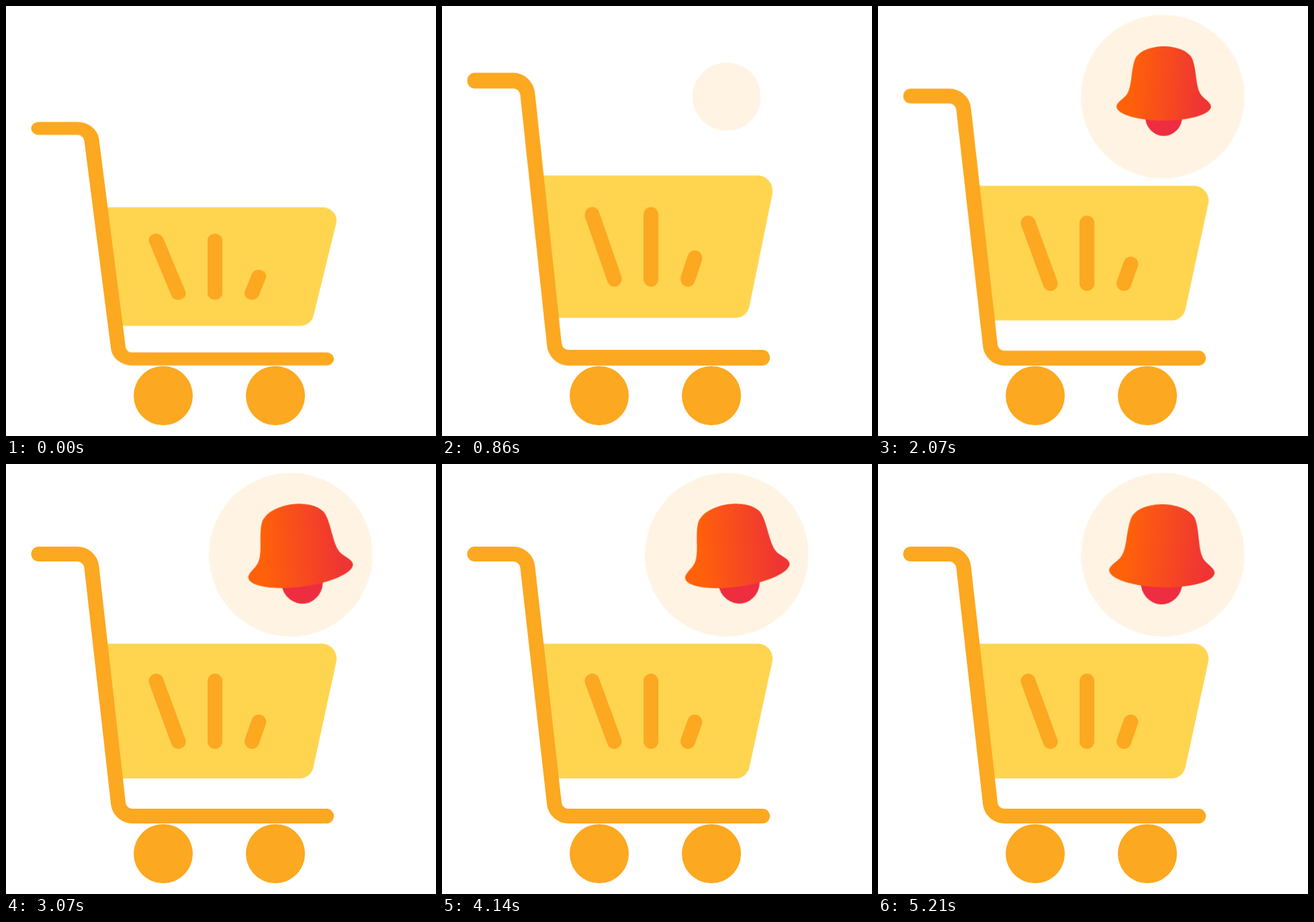
An HTML page for the animation above (5.28 s loop, 640 by 640 pixels).

```html
<!DOCTYPE html>
<html lang="en">
<head>
<meta charset="utf-8">
<title>Cart alert</title>
<style>
  html, body { margin: 0; width: 100%; height: 100%; overflow: hidden; background: #fff; }
  svg { display: block; width: 100%; height: 100%; }
  .line { fill: none; stroke: #fca820; stroke-width: 22; stroke-linecap: round; }
  #cart, #disc, #bell { transform-box: view-box; transform-origin: 0 0; }
</style>
</head>
<body>
<svg viewBox="0 0 640 640">
  <defs>
    <linearGradient id="glow" gradientUnits="userSpaceOnUse" x1="-52" y1="58" x2="66" y2="66">
      <stop offset="0" stop-color="#ff610a"/>
      <stop offset="1" stop-color="#ef3434"/>
    </linearGradient>
  </defs>

  <!-- The cart stretches upward from its base line -->
  <g transform="translate(0 535)">
    <g id="cart">
      <g transform="translate(0 -535)">
        <path fill="#ffd550" d="M147 267.5H470C484 267.5 494.5 280 491.5 294.5L457.5 451.5C455.5 461 447 468 437.5 468H170Z"/>
        <path class="line" d="M48.5 134H106A21.5 21.5 0 0 1 127.4 153.1L167.1 505.3A21 21 0 0 0 188 524H477"/>
        <path class="line" d="M223.5 323L256.5 413M311 323V413M376.2 384L366 413"/>
      </g>
    </g>
  </g>
  <g fill="#fca820">
    <circle cx="234" cy="580" r="44"/>
    <circle cx="401" cy="580" r="44"/>
  </g>

  <g transform="translate(423.7 135)">
    <circle id="disc" r="121.8" fill="#fff4e3"/>
  </g>

  <!-- The bell hangs from the middle of its top edge -->
  <g transform="translate(425.3 60)">
    <g id="bell">
      <ellipse cy="116" rx="31" ry="33" fill="#ee2d40"/>
      <path fill="url(#glow)" d="M0 0C18 0 36 6 43 14.5C50 20 52 38 54 53C56 68 58 78 66 85C72 90 78.5 95 78.5 100C78.5 113 42 123.5 0 123.5C-42 123.5 -78.5 113 -78.5 100C-78.5 95 -72 90 -66 85C-58 78 -56 68 -54 53C-52 38 -50 20 -43 14.5C-36 6 -18 0 0 0Z"/>
    </g>
  </g>
</svg>
<script>
  const LOOP = 5280, BEAT = LOOP / 10, SWING = 12;

  // Each step is [time in ms, value]; values between steps run linearly.
  function play(id, steps, toTransform) {
    const frames = steps.map(([time, value]) => ({
      offset: time / LOOP,
      transform: toTransform(value)
    }));
    const anim = document.getElementById(id).animate(frames, {
      duration: LOOP, iterations: Infinity, easing: 'linear'
    });
    anim.startTime = 0;
    return anim;
  }

  const pose = ([angle, size]) => `rotate(${angle}deg) scale(${size})`;

  const swings = [0, 1, -1, 1, -1, 1, 0].map(
    (side, i) => [BEAT * (4 + i), [side * SWING, 1]]
  );

  const anims = [
    play('cart', [[0, 0.88], [BEAT, 1.155], [BEAT * 2, 1], [LOOP, 1]], s => `scale(1, ${s})`),
    play('disc', [[0, 0], [690, 0], [1100, 1], [LOOP, 1]], s => `scale(${s})`),
    play('bell', [[0, [0, 0]], [1720, [0, 0]], ...swings], pose)
  ];

  const start = document.timeline.currentTime || 0;
  anims.forEach(a => { a.startTime = start; });
</script>
</body>
</html>
```
